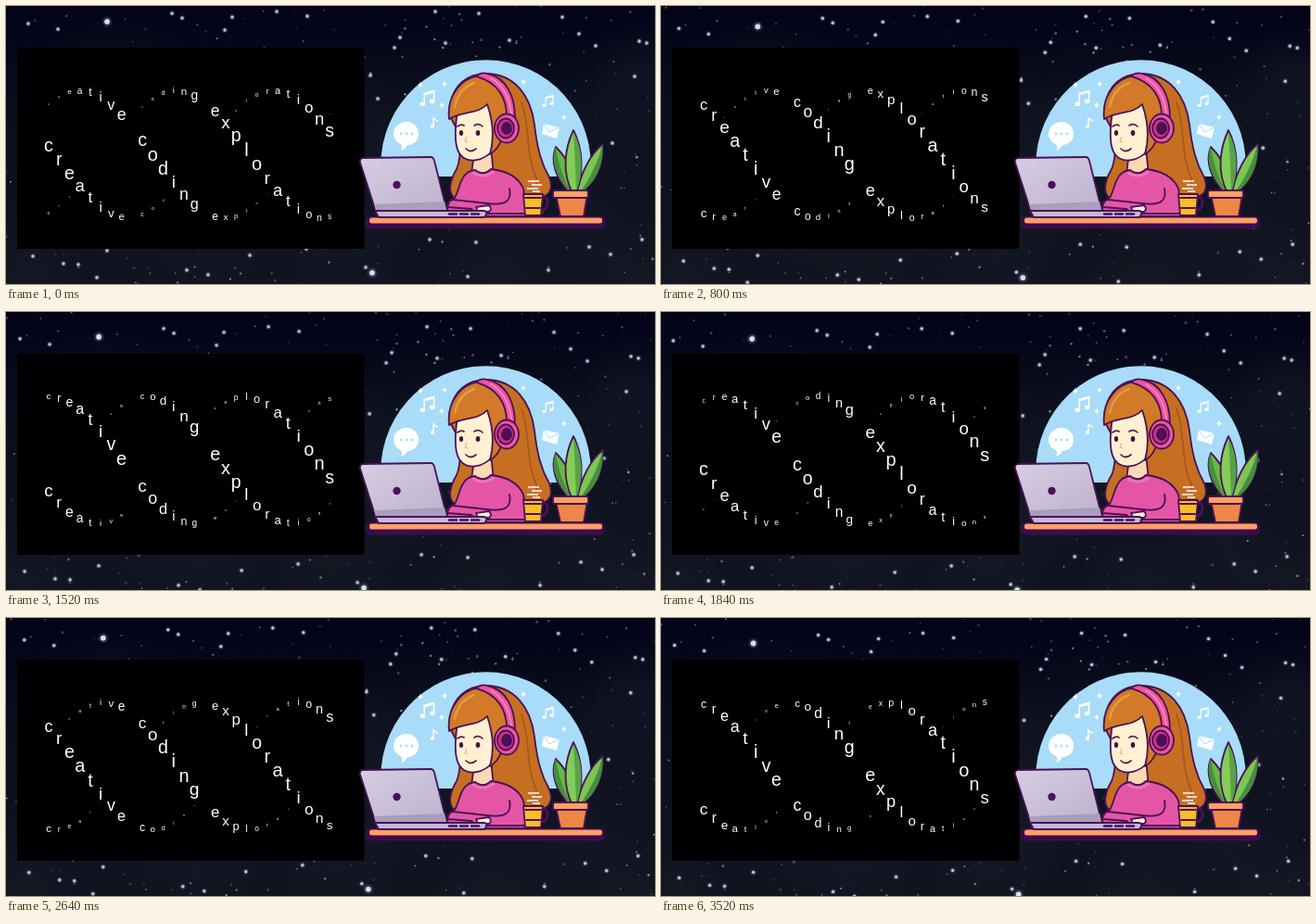
Recreate the animation shown at these times as an HTML page with a canvas. Size 700x300 px, loop 3600 ms.

```html
<!DOCTYPE html>
<html lang="en">
<head>
<meta charset="utf-8">
<title>Creative coding explorations</title>
<style>
  html, body { margin: 0; width: 100%; height: 100%; overflow: hidden; background: #080b18; }
  canvas, svg { position: absolute; left: 0; top: 0; width: 700px; height: 300px; }
  .line { stroke: #4a1059; stroke-width: 1.8; stroke-linejoin: round; stroke-linecap: round; }
  .none { fill: none; }
  .flat { stroke: none; }
</style>
</head>
<body>
<canvas id="stage" width="700" height="300"></canvas>
<svg viewBox="0 0 700 300">
  <defs>
    <linearGradient id="lid" x1="0" y1="0" x2="1" y2="1">
      <stop offset="0" stop-color="#d6cee1"/><stop offset="1" stop-color="#bcb2cd"/>
    </linearGradient>
    <path id="spark" d="M0-3.5Q.5-.5 3 0Q.5.5 0 3.5Q-.5.5-3 0Q-.5-.5 0-3.5Z"/>
    <g id="note">
      <path d="M-4 6V-6L7-9V3" fill="none" stroke="#fff" stroke-width="1.6"/>
      <path d="M-4-5L7-8" stroke="#fff" stroke-width="2.4"/>
      <ellipse cx="-6" cy="6" rx="3" ry="2.4"/><ellipse cx="5" cy="3" rx="3" ry="2.4"/>
    </g>
  </defs>

  <path d="M405 184A113.2 113.2 0 1 1 630 184Z" fill="#a9dcf8"/>
  <g fill="#fff">
    <use href="#note" transform="translate(455 100) scale(.95)"/>
    <use href="#note" transform="translate(585 103) scale(.72)"/>
    <path d="M461 130V121Q464 124 466 124" fill="none" stroke="#fff" stroke-width="1.5"/>
    <circle cx="460" cy="130" r="2"/>
    <path d="M432 125c8 0 13 6 13 13s-5 12-12 12c-1 3-4 5-7 6c2-3 1-5 0-7c-5-2-8-6-8-11c0-7 6-13 14-13Z"/>
    <path d="M580 127L597 131L594 143L578 138Z"/>
    <path d="M580 127L586 136L597 131" fill="none" stroke="#a9dcf8"/>
    <use href="#spark" x="447" y="85"/><use href="#spark" x="473" y="84"/>
    <use href="#spark" x="470" y="107"/><use href="#spark" x="558" y="82"/>
    <use href="#spark" x="602" y="120"/>
  </g>
  <g fill="#a9dcf8"><circle cx="426" cy="138" r="1.4"/><circle cx="432" cy="138" r="1.4"/><circle cx="438" cy="138" r="1.4"/></g>

  <!-- girl -->
  <g class="line">
    <path d="M480 121C476 93 491 74 517 73C549 73 566 97 570 128C573 154 577 169 586 185Q592 201 579 206C566 211 551 211 534 211L484 207C475 201 480 186 486 176C491 165 490 150 490 140Z" fill="#c66f22"/>
    <path d="M556 104C566 132 560 160 572 186Q574 195 568 205" class="none" stroke="#a8591a"/>
    <path d="M505 158L523 152L526 183Q514 192 502 181Z" fill="#fbd9b4"/>
    <path d="M487 113C484 133 483 150 489 159C496 170 513 169 525 156L533 120L514 99Z" fill="#fff0d2"/>
    <path d="M478 122C475 97 491 75 516 75C533 75 542 90 543 111L538 126Q536 152 522 160Q529 135 519 106C509 117 493 113 478 122Z" fill="#d27a27"/>
    <path d="M484 109Q488 89 505 83" class="none" stroke="#e39a45" stroke-width="2.5"/>
    <path d="M476 220Q476 210 484 207C488 200 489 192 492 187Q496 178 506 177Q515 184 523 176C540 178 553 185 558 197L563 227H494Z" fill="#e456a5"/>
    <path d="M543 197C546 212 537 215 519 213L482 209Q475 211 476 217L502 219L508 224H560" class="none"/>
    <path d="M507 217L521 215Q525 219 521 222H509Z" fill="#fff0d2"/>
    <path d="M504 180Q514 187 526 179" class="none" stroke="#f277b8" stroke-width="2.5"/>
  </g>
  <path d="M487 130q4-3 7-1M505 129q5-3 9 1M496 154q5 5 11 0" fill="none" stroke="#5b203f" stroke-width="1.7" stroke-linecap="round"/>
  <path d="M497 141l-2 5l3 1" fill="none" stroke="#dfa582"/>
  <g fill="#41143f"><ellipse cx="491" cy="137" rx="2.1" ry="2.9"/><ellipse cx="509" cy="137" rx="2.3" ry="3"/></g>
  <g class="line">
    <path d="M507 76Q512 71 519 73C540 77 549 98 549 121L540 122C541 99 530 82 507 76Z" fill="#ee559f"/>
    <path d="M523 78Q542 89 545 116" class="none" stroke="#ff86bd"/>
    <ellipse cx="540" cy="132" rx="13" ry="15.5" fill="#ee559f"/>
    <ellipse cx="539" cy="132" rx="9" ry="10.5" fill="#c9327f"/>
    <ellipse cx="540" cy="132" rx="5" ry="6" fill="#4a1059"/>
  </g>

  <!-- desk and laptop -->
  <rect x="388" y="227" width="258" height="13.5" rx="5" fill="#3d0b4d"/>
  <rect x="392" y="228.5" width="251" height="6" rx="2.5" fill="#ff9f66"/>
  <g class="line">
    <path d="M385 164L458 163Q461 163 462 167L475 219Q476 222 472 222L403 223Q399 223 398 219L382 169Q381 165 385 164Z" fill="url(#lid)"/>
    <path d="M397 214L473 211L475 220L399 221Z" fill="#a99fbc" class="flat"/>
    <ellipse cx="421.500" cy="193" rx="4.2" ry="4.2" fill="#4a1059" class="flat"/>
    <path d="M398 221H515Q519 221 518 225L516 228H402Z" fill="#c5bad5"/>
    <path d="M478 224.500H512" stroke="#4a1059" stroke-width="2.5" stroke-dasharray="8 4"/>
  </g>

  <!-- mug and plant -->
  <g class="line">
    <path d="M577 206q8-1 7 7q-1 8-8 7" class="none" stroke-width="3"/>
    <path d="M558 203H579L577 226H560Z" fill="#f9bd25"/>
    <path d="M560 207H577M561 218H576"/>
    <path d="M608 202C592 185 587 167 593 152C607 166 614 183 612 202Z" fill="#68b843"/>
    <path d="M593 152C596 172 602 187 609 200C593 185 587 167 593 152Z" fill="#468f3c" class="flat"/>
    <path d="M615 203C620 182 628 162 643.500 149C645 173 635 192 618 203Z" fill="#7dc653"/>
    <path d="M643.500 149C645 173 635 192 618 203Q637 176 643.500 149Z" fill="#468f3c" class="flat"/>
    <path d="M611 202C599 178 603 153 612 134C623 155 623 182 615 202Z" fill="#83cd58"/>
    <path d="M612 136C623 155 623 182 615 201Q614 166 612 136Z" fill="#57a346" class="flat"/>
    <path d="M593 204H627L623 227H598Z" fill="#ed8747"/>
    <rect x="590" y="199" width="38" height="8" rx="2" fill="#ff9f60"/>
  </g>
  <path d="M563 189H575M567 193H578M562 197H574M568 200H576" stroke="#fff" stroke-width="1.5"/>
  <path d="M563 191H570M569 195H577" stroke="#f06b53"/>
</svg>
<script>
const ctx = document.getElementById('stage').getContext('2d');
const LOOP = 3600, STEP = 80, RAD = Math.PI / 180;
const TEXT = 'creative coding explorations';
// step, helix angle in degrees
const turn = [[0, -7.7], [10, -50.2], [19, -90.8], [23, -111], [33, -158], [39, -179.5], [44, -197]];

let seed = 29;
const rand = () => (seed = (seed * 16807) % 2147483647) / 2147483647;

const bright = [[109, 17], [395, 288], [56, 25], [24, 19], [190, 13], [179, 8], [244, 12], [236, 26],
  [292, 6], [325, 11], [463, 6], [510, 8], [474, 40], [543, 37], [600, 12], [618, 30], [636, 43],
  [683, 38], [691, 40], [678, 76], [654, 148], [388, 282], [324, 262], [263, 269], [218, 290],
  [195, 285], [109, 264], [98, 293], [78, 279], [29, 270], [62, 278], [457, 252], [507, 255],
  [629, 260], [652, 268], [686, 252], [498, 292], [585, 285], [393, 75], [401, 100], [425, 34], [419, 45]];
const stars = bright.map(([x, y], i) => ({ x, y, r: i < 2 ? 2.8 : 1.7, a: i < 2 ? 1 : .8 }));
for (let i = 0; i < 280; i++) {
  stars.push({ x: rand() * 730, y: rand() * 330 - 20, r: .6 + rand() * .9, a: .12 + rand() * .5 });
}
const clouds = Array.from({ length: 14 }, () => ({ x: rand() * 700, y: 60 + rand() * 240, r: 50 + rand() * 80 }));

function glow(x, y, r, color, alpha) {
  const g = ctx.createRadialGradient(x, y, 0, x, y, r);
  g.addColorStop(0, `rgba(${color},${alpha})`);
  g.addColorStop(1, `rgba(${color},0)`);
  ctx.fillStyle = g;
  ctx.fillRect(x - r, y - r, 2 * r, 2 * r);
}

function drawSky(frame) {
  const g = ctx.createLinearGradient(0, 0, 0, 300);
  g.addColorStop(0, '#020318');
  g.addColorStop(.4, '#0b0f1d');
  g.addColorStop(1, '#10141f');
  ctx.fillStyle = g;
  ctx.fillRect(0, 0, 700, 300);
  const n = frame % 24, dx = -.47 * n, dy = .52 * n;
  for (const c of clouds) glow(c.x + dx, c.y + dy, c.r, '32,37,48', .25);
  for (const s of stars) {
    const x = s.x + dx, y = s.y + dy;
    if (s.r > 1.6) glow(x, y, s.r * 2.2, '180,194,228', s.a * .6);
    ctx.fillStyle = `rgba(215,223,244,${s.a})`;
    ctx.beginPath();
    ctx.arc(x, y, s.r, 0, 2 * Math.PI);
    ctx.fill();
  }
}

function angleAt(frame) {
  let i = 1;
  while (turn[i][0] < frame) i++;
  const [f0, a0] = turn[i - 1], [f1, a1] = turn[i];
  return a0 + (a1 - a0) * (frame - f0) / (f1 - f0);
}

function drawHelix(frame) {
  ctx.fillStyle = '#000';
  ctx.fillRect(12, 45, 374.5, 217);
  ctx.fillStyle = '#fff';
  ctx.textAlign = 'center';
  ctx.textBaseline = 'middle';
  const base = angleAt(frame);
  for (let strand = 0; strand < 3; strand++) {
    [...TEXT].forEach((ch, i) => {
      const a = (base + strand * 120 + i * 360 / TEXT.length) * RAD;
      const size = 10 + 10 * Math.cos(a);
      if (size < 1) return;
      ctx.font = `${size}px "Liberation Sans", Arial, sans-serif`;
      ctx.fillText(ch, 46 + i * 11.23, 160.2 + 68.5 * Math.sin(a));
    });
  }
}

function draw() {
  const frame = Math.floor((performance.now() % LOOP) / STEP);
  drawSky(frame);
  drawHelix(frame);
  requestAnimationFrame(draw);
}
draw();
</script>
</body>
</html>
```
